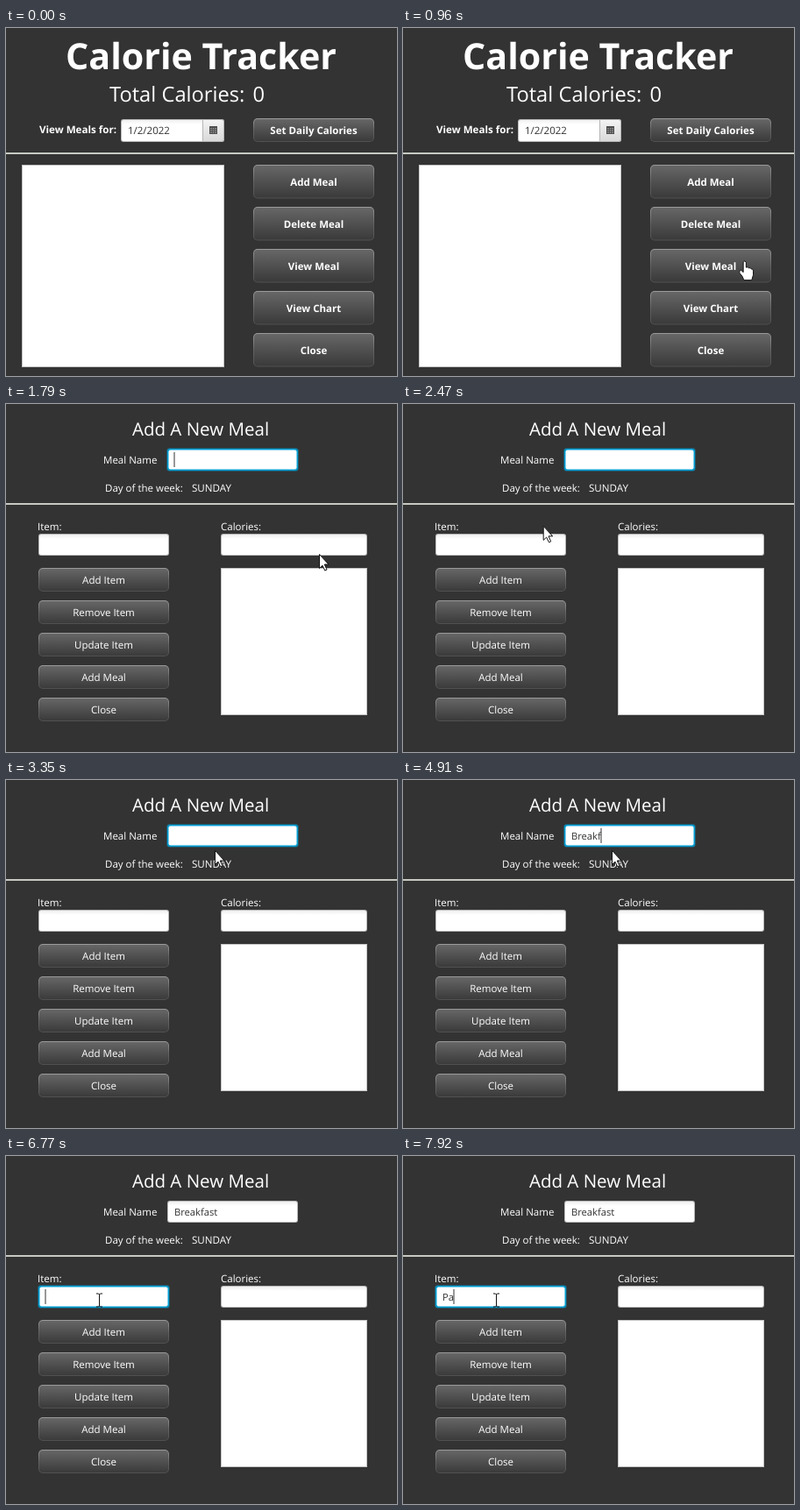
Animation of 446 by 397 pixels, one loop 8000 ms. Source, as an HTML page with a canvas:

```html
<!DOCTYPE html>
<html lang="en">
<head>
<meta charset="utf-8">
<title>Calorie Tracker</title>
<style>
html, body { margin: 0; width: 100%; height: 100%; overflow: hidden; background: #333; }
canvas { display: block; }
</style>
</head>
<body>
<canvas id="stage" width="446" height="397"></canvas>
<script>
const ctx = document.getElementById('stage').getContext('2d');
const LOOP = 8000;
const mainButtons = [
  ['Set Daily Calories', 282, 103, 138, 27],
  ...['Add Meal', 'Delete Meal', 'View Meal', 'View Chart', 'Close']
    .map((label, i) => [label, 282, 156 + 48 * i, 138, 38.5])
];
const mealButtons = ['Add Item', 'Remove Item', 'Update Item', 'Add Meal', 'Close']
  .map((label, i) => [label, 37, 187 + 37 * i, 149, 27]);
const fields = { name: [184, 51, 149, 25], item: [37, 148, 149, 25], calories: [245, 148, 167, 25] };

// Start, end, then the four control points of each pointer stroke
const moves = [
  [790, 1130, [423, 375], [405, 310], [372, 215], [356, 171]],
  [1790, 1790, [357, 171], [357, 171], [357, 171], [357, 171]],
  [2040, 2680, [357, 171], [180, 215], [68, 170], [238, 80]],
  [6020, 6230, [238, 80], [200, 105], [140, 145], [109, 173]],
  [6480, 6620, [109, 173], [108, 170], [107, 167], [106, 164]]
];
const nameKeys = [4050, 4310, 4410, 4510, 4740, 4910, 5030, 5150, 5350];
const itemKeys = [7590, 7920];
const focusChange = 6650;
const nameCaret = [[1790, 2290], [2680, 3350], [3410, 3890], [4050, 5880], [6350, focusChange]];

const within = (t, [a, b]) => t >= a && t < b;
const typed = (word, keys, t) => word.slice(0, keys.filter(k => t >= k).length);
const hit = (x, y, [l, top, w, h]) => x >= l && x <= l + w && y >= top && y <= top + h;

function text(str, x, y, size, { color = '#fff', weight = 400, align = 'left' } = {}) {
  ctx.font = `${weight} ${size}px "Open Sans", "Noto Sans", sans-serif`;
  ctx.textAlign = align;
  ctx.fillStyle = color;
  ctx.fillText(str, x, y);
}

function gradient(y, h, ...colors) {
  const g = ctx.createLinearGradient(0, y, 0, y + h);
  colors.forEach((c, i) => g.addColorStop(i / (colors.length - 1), c));
  return g;
}

function box(x, y, w, h, r, fill) {
  ctx.beginPath();
  ctx.roundRect(x, y, w, h, r);
  ctx.fillStyle = fill;
  ctx.fill();
}

function button([label, x, y, w, h], weight) {
  box(x, y, w, h, 5, gradient(y, h, '#9c9c9c', '#646464', '#505050'));
  box(x + 1, y + 1, w - 2, h - 2, 4, gradient(y, h, '#686868', '#505050', '#393939'));
  text(label, x + w / 2, y + h / 2 + 4.3, 11.5, { weight, align: 'center' });
}

function field([x, y, w, h], focused) {
  if (focused) {
    box(x - 1, y - 1, w + 2, h + 2, 4, 'rgba(3,158,211,.35)');
    box(x, y, w, h, 3, '#039ed3');
    box(x + 1.5, y + 1.5, w - 3, h - 3, 2, '#fff');
  } else {
    box(x, y, w, h, 3, '#b9b9b9');
    box(x + 1, y + 1, w - 2, h - 2, 2, gradient(y, 6, '#ededed', '#fff'));
  }
}

function list(x, y, w, h) {
  box(x, y, w, h, 0, '#c4c4c4');
  box(x + 1, y + 1, w - 2, h - 2, 0, '#fff');
}

function inputText(str, x, baseline, caret) {
  text(str, x, baseline, 11.2, { color: '#333' });
  if (caret) ctx.fillRect(Math.round(x + ctx.measureText(str).width) - .5, baseline - 13, 1, 17);
}

function separator(y) {
  box(0, y, 446, 2, 0, '#c6cac2');
}

function datePicker() {
  field([131, 104, 118, 26]);
  box(224, 104, 25, 26, [0, 3, 3, 0], '#b5b5b5');
  box(225, 105, 23, 24, [0, 2, 2, 0], gradient(105, 24, '#f3f3f3', '#d9d9d9'));
  box(232, 112, 9, 9, 0, '#4c4c4c');
  for (let i = 0; i < 9; i++)
    box(233.2 + i % 3 * 2.6, 114.3 + Math.floor(i / 3) * 2.2, 1.5, 1, 0, '#b8b8b8');
  text('1/2/2022', 139, 121, 11.5, { color: '#333' });
}

function mainScreen() {
  text('Calorie Tracker', 222.5, 47, 41.2, { weight: 700, align: 'center' });
  text('Total Calories:', 118, 84, 23.7);
  text('0', 281.5, 84, 23.7);
  text('View Meals for:', 38, 120, 11.6, { weight: 700 });
  datePicker();
  separator(142);
  list(18, 156, 231, 231);
  mainButtons.forEach(b => button(b, 700));
}

function mealScreen(t) {
  const onName = t < focusChange;
  text('Add A New Meal', 222, 36, 20.5, { align: 'center' });
  text('Meal Name', 111, 68, 11.5);
  text('Day of the week:', 113, 100, 11.5);
  text('SUNDAY', 212, 100, 11.6);
  separator(113);
  text('Item:', 36, 144, 11.5);
  text('Calories:', 245, 144, 11.5);
  field(fields.name, onName);
  field(fields.item, !onName);
  field(fields.calories);
  list(245, 187, 167, 168);
  mealButtons.forEach(b => button(b, 400));
  inputText(typed('Breakfast', nameKeys, t), 192, 68, nameCaret.some(s => within(t, s)));
  inputText(typed('Pa', itemKeys, t), 45, 165, !onName);
}

const shapes = {
  arrow: new Path2D('M.5 .5V16.5L4 13.2L6.8 19L9 18L6.3 12H11Z'),
  hand: new Path2D('M-.6 2Q1 -.4 2.6 2V8Q5 6.8 5.6 8.8Q8 7.6 8.4 9.8Q10.8 9.2 10.8 12V16.5L9 22.5H0L-1.5 18.5L-5 14Q-5.4 11 -3 11.2L-.6 13.5Z'),
  beam: new Path2D('M-3.5 -7.5H-1L0 -6.5L1 -7.5H3.5M0 -6.5V6.5M-3.5 7.5H-1L0 6.5L1 7.5H3.5')
};

function pointerAt(t) {
  const [start, end, ...p] = moves.filter(m => t >= m[0]).pop();
  const k = end > start ? Math.min(1, (t - start) / (end - start)) : 1;
  const u = k * k * (3 - 2 * k), v = 1 - u;
  return [0, 1].map(i =>
    p[0][i] * v ** 3 + 3 * p[1][i] * u * v * v + 3 * p[2][i] * u * u * v + p[3][i] * u ** 3);
}

function pointer(t) {
  const [x, y] = pointerAt(t);
  let kind = 'arrow';
  if (t < 1790) {
    if (mainButtons.some(([, ...r]) => hit(x, y, r)) || t >= 1130) kind = 'hand';
  } else if (t > 2040 && Object.values(fields).some(r => hit(x, y, r))) kind = 'beam';

  if (within(t, [1670, 1790])) {
    ctx.beginPath();
    ctx.arc(356, 171, 12, 0, 7);
    ctx.fillStyle = 'rgba(190,182,30,.8)';
    ctx.fill();
  }
  ctx.save();
  ctx.translate(x, y);
  ctx.lineWidth = 1;
  ctx.strokeStyle = '#111';
  if (kind === 'beam') {
    ctx.translate(.5, .5);
  } else {
    ctx.fillStyle = '#fff';
    ctx.fill(shapes[kind]);
  }
  ctx.stroke(shapes[kind]);
  ctx.restore();
}

function draw(now) {
  const t = now % LOOP;
  ctx.textRendering = 'geometricPrecision';
  box(0, 0, 446, 397, 0, '#333');
  if (t < 1790) mainScreen();
  else mealScreen(t);
  if (t >= 800) pointer(t);
}

let begin;
function tick(now) {
  begin ??= now;
  draw(now - begin);
  requestAnimationFrame(tick);
}
requestAnimationFrame(tick);
</script>
</body>
</html>
```
